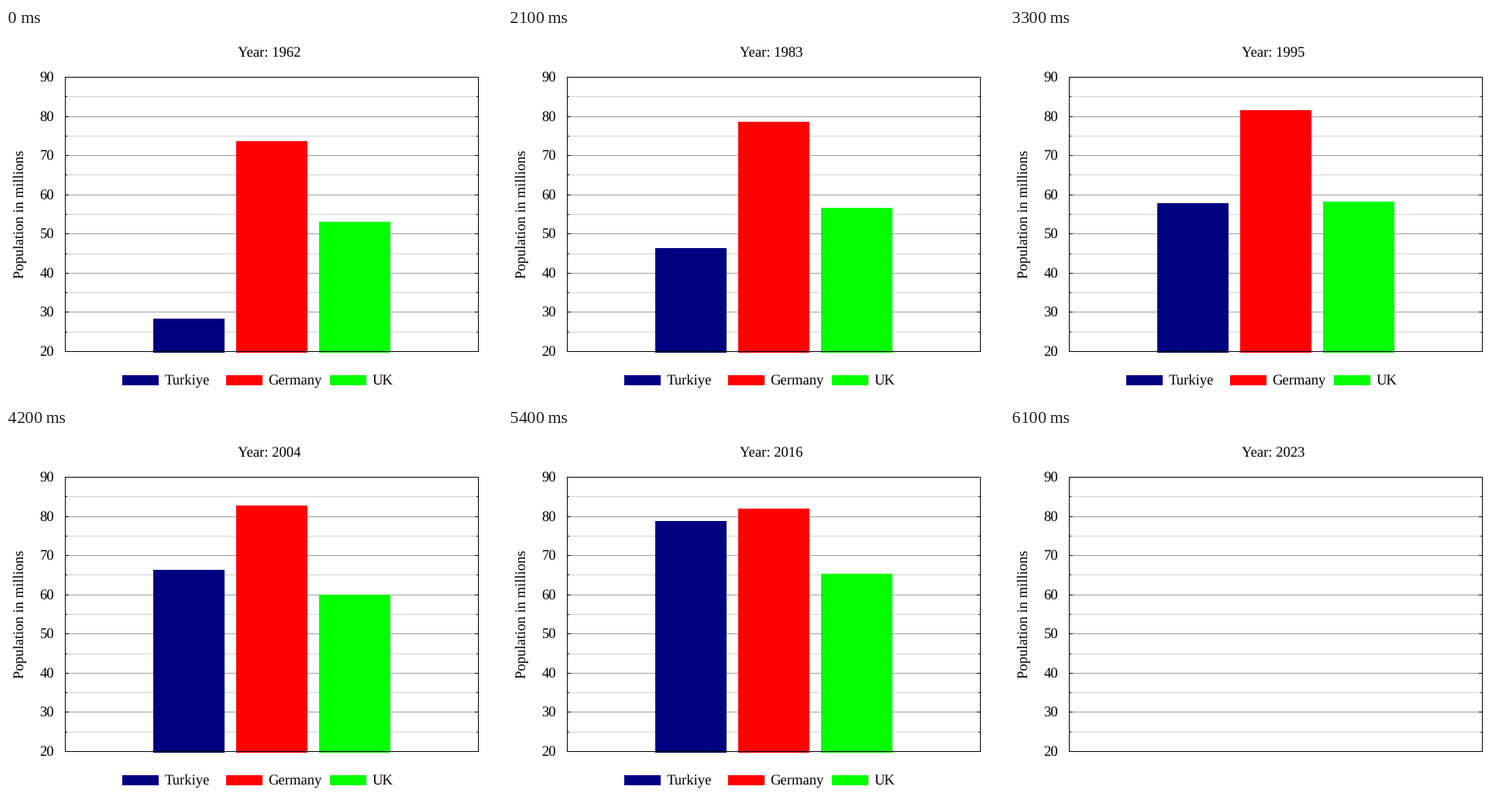
A matplotlib script that plays this animation: 640 by 480 pixels, repeating every 6.2 s.

```python
import math

import numpy as np
import matplotlib.pyplot as plt
from matplotlib.animation import FuncAnimation
from matplotlib.patches import Rectangle

plt.rcParams["font.family"] = "Liberation Serif"
plt.rcParams["text.hinting"] = "none"

W, H, DPI = 640, 480, 100
LEFT, RIGHT, TOP, BOTTOM = 76, 609, 63, 417
LOW, HIGH = 20, 90
FIRST_YEAR, FRAMES, INTERVAL = 1962, 62, 100
FONT_SIZE = 14 * 96 / DPI

# Key points (year, millions) where the growth rate turns.
TURKIYE = [(1961, 28.15), (1968, 33.22), (1975, 39.19), (1982, 46.03),
           (2003, 66.09), (2010, 72.33), (2018, 82.32), (2021, 84.78)]
GERMANY = [(1961, 73.38), (1966, 76.6), (1973, 78.94), (1977, 78.16),
           (1982, 78.35), (1986, 77.6), (1993, 81.16), (1997, 82.03),
           (2003, 82.53), (2010, 81.78), (2011, 80.27), (2014, 80.9),
           (2016, 82.35), (2021, 83.3)]
UK = [(1961, 52.8), (1965, 54.35), (1972, 56.15), (1982, 56.3),
      (1990, 57.25), (2000, 58.89), (2004, 59.99), (2016, 65.61),
      (2021, 67.33)]

SERIES = [("Turkiye", "#000080", TURKIYE),
          ("Germany", "#ff0000", GERMANY),
          ("UK", "#00ff00", UK)]
BAR_LEFT, BAR_PITCH, BAR_WIDTH, BAR_BASE = 190, 107, 92, BOTTOM + 2
KEY_LEFT, KEY_PITCH = 150, 134

fig = plt.figure(figsize=(W / DPI, H / DPI), dpi=DPI, facecolor="white")
ax = fig.add_axes([0, 0, 1, 1])
ax.set_xlim(0, W)
ax.set_ylim(H, 0)
ax.axis("off")


def rect(x, y, w, h, color, z):
    return ax.add_patch(Rectangle((x, y), w, h, facecolor=color, linewidth=0,
                                  antialiased=False, zorder=z))


def label(x, y, s, ha="left", **kw):
    return ax.text(x, y, s, ha=ha, va="baseline", fontsize=FONT_SIZE,
                   color="black", zorder=5, **kw)


def row(value):
    """Pixel row of a value on the vertical axis."""
    scale = (BOTTOM - TOP) / (HIGH - LOW)
    return math.floor(BOTTOM + 0.5 - (value - LOW) * scale)


def draw_axes():
    width = RIGHT - LEFT + 1
    for value in range(LOW, HIGH + 1, 5):
        y = row(value)
        major = value % 10 == 0
        if LOW < value < HIGH:
            tic = 5 if major else 3
            rect(LEFT, y, width, 1, "#a0a0a0" if major else "#d3d3d3", 1)
            rect(LEFT, y, tic, 1, "black", 3)
            rect(RIGHT + 1 - tic, y, tic, 1, "black", 3)
        if major:
            label(62.2, y + 6, str(value), ha="right")
    for y in (TOP, BOTTOM):
        rect(LEFT, y, width, 1, "black", 3)
    for x in (LEFT, RIGHT):
        rect(x, TOP, 1, BOTTOM - TOP + 1, "black", 3)
    label(23, 240.5, "Population in millions", ha="center", rotation=90,
          rotation_mode="anchor")


draw_axes()
title = label(339.8, 37, "", ha="center")
bars, legend = [], []
for k, (name, color, _) in enumerate(SERIES):
    key_x = KEY_LEFT + k * KEY_PITCH
    bars.append(rect(BAR_LEFT + k * BAR_PITCH, BAR_BASE, BAR_WIDTH, 0, color, 2))
    legend.append(rect(key_x, 448, 47, 13, color, 2))
    legend.append(label(key_x + 54.5, 460, name))


def update(i):
    year = FIRST_YEAR + i
    title.set_text(f"Year: {year}")
    # Bars show the count of the year before; the last year has none.
    for bar, (_, _, points) in zip(bars, SERIES):
        top = row(np.interp(year - 1, *zip(*points))) - 1
        bar.set_y(top)
        bar.set_height(BAR_BASE - top)
    for artist in bars + legend:
        artist.set_visible(i < FRAMES - 1)
    return [title, *bars, *legend]


anim = FuncAnimation(fig, update, frames=FRAMES, interval=INTERVAL,
                     repeat=True, repeat_delay=0, blit=False)
plt.show()
```
